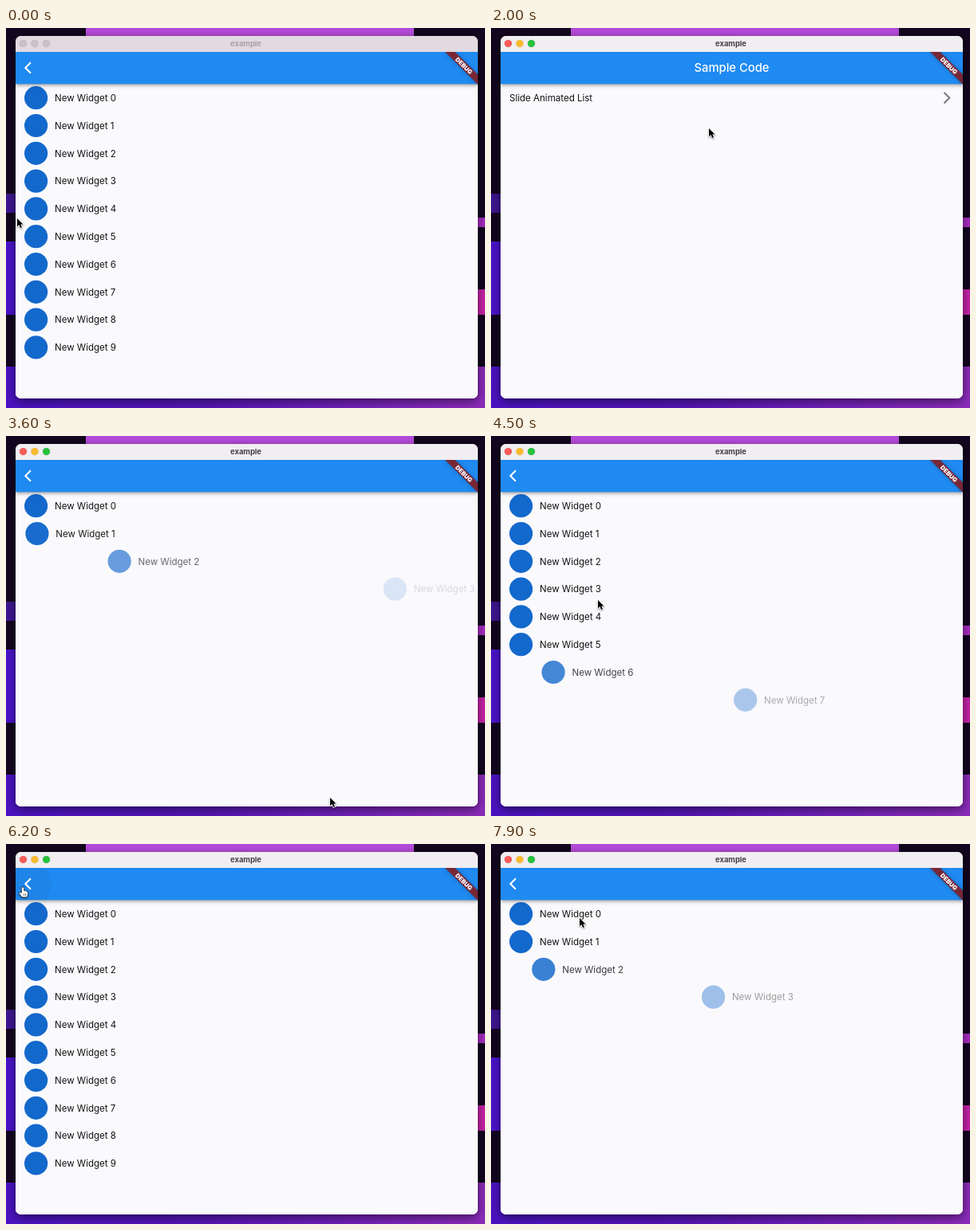
An HTML page with a canvas for the animation above (8000 ms loop, 600x477 px).

```html
<!DOCTYPE html>
<html lang="en">
<head>
<meta charset="utf-8">
<title>Slide animated list</title>
<style>
  html, body { margin: 0; width: 100%; height: 100%; overflow: hidden; background: #12051f; }
  canvas { display: block; width: 600px; height: 477px; }
</style>
</head>
<body>
<canvas id="stage" width="600" height="477"></canvas>
<script>
const c = document.getElementById('stage').getContext('2d');
const LOOP = 8000, STEP = 100;
const FONT = 'Inter, Roboto, sans-serif';
const LEFT = 12, RIGHT = 591, TOP = 30, BAR = 70, BOTTOM = 465, WIDTH = RIGHT - LEFT;
const ROW = 34.8, FIRST = 87.7;
const BG = '#faf9fc', BLUE = '#1f8af1', DISC = '#1368cc', INK = '#131214';

// Page changes; list items start entering at each push.
const POPS = [1020, 6330], PUSHES = [2935, 7132];
const PAGE_MS = 450, ITEM_MS = 500, STAGGER = 205, PRESS_MS = 220, ACTIVE_AT = 700;

// Pointer moves: when they start and end, and where they lead
const REST = { x: 14, y: 239 };
const MOVES = [
  { from: 0, to: 600, x: 22, y: 54 },
  { from: 1200, to: 2000, x: 273, y: 126 },
  { from: 2000, to: 2600, x: 274, y: 93 },
  { from: 2950, to: 3600, x: 406, y: 454 },
  { from: 3700, to: 4500, x: 134, y: 206 },
  { from: 4500, to: 5300, x: 21, y: 54 },
  { from: 6400, to: 6850, x: 111, y: 93 }
];

const ARROW = new Path2D('M0 0V10.2L2.4 8 4.1 12 6 11.2 4.3 7.4H7.5Z');
const HAND = new Path2D('M-1.3 1Q0-.7 1.3 1V4.7L5 5.6Q6.7 6.2 6.2 8.6L5.1 12.6H-.8L-4.3 8.2Q-4.6 6.1-2.7 6.9L-1.3 8Z');

const clamp = v => Math.max(0, Math.min(1, v));
const easeOut = (v, power) => 1 - (1 - clamp(v)) ** power;
const smooth = v => v * v * (3 - 2 * v);

function rect(x, y, w, h, color) {
  c.fillStyle = color;
  c.fillRect(x, y, w, h);
}

function disc(x, y, r, color) {
  c.fillStyle = color;
  c.beginPath();
  c.arc(x, y, r, 0, 7);
  c.fill();
}

function chevron(x, y, dx, color) {
  c.strokeStyle = color;
  c.lineWidth = 2.1;
  c.beginPath();
  c.moveTo(x - dx, y - 6.7);
  c.lineTo(x, y);
  c.lineTo(x - dx, y + 6.7);
  c.stroke();
}

function text(str, x, y, size, weight, color, align = 'left') {
  c.font = `${weight} ${size}px ${FONT}`;
  c.textAlign = align;
  c.fillStyle = color;
  c.fillText(str, x, y);
}

function shadow(color, blur, dy) {
  c.shadowColor = color;
  c.shadowBlur = blur;
  c.shadowOffsetY = dy;
}

function clipped(x, y, w, h, draw) {
  c.save();
  c.beginPath();
  c.rect(x, y, w, h);
  c.clip();
  draw();
  c.restore();
}

function pointerAt(t) {
  let { x, y } = REST;
  for (const m of MOVES) {
    const k = smooth(clamp((t - m.from) / (m.to - m.from)));
    x += (m.x - x) * k;
    y += (m.y - y) * k;
  }
  return { x, y };
}

// How far the list page covers the home page, and when its items began.
function pageAt(t) {
  let open = 1, since = -LOOP;
  POPS.forEach((pop, i) => {
    if (t >= pop) open = 1 - easeOut((t - pop) / PAGE_MS, 3);
    if (t >= PUSHES[i]) {
      open = easeOut((t - PUSHES[i]) / PAGE_MS, 3);
      since = PUSHES[i];
    }
  });
  return { open, since };
}

// The blurred edges of a wallpaper around the window
function desktop() {
  rect(0, 0, 600, 477, '#12051f');
  const floor = c.createLinearGradient(0, 0, 600, 0);
  floor.addColorStop(0, '#4a12c0');
  floor.addColorStop(0.4, '#5414b4');
  floor.addColorStop(1, '#8a2bb8');
  rect(0, 425, 600, 52, floor);
  rect(100, 0, 411, 12, '#b84bdb');
  rect(0, 208, 14, 24, '#3d1590');
  rect(0, 268, 14, 92, '#4a12c8');
  rect(590, 238, 10, 12, '#a52cc0');
  rect(590, 328, 10, 32, '#c421a6');
}

function titleBar(active) {
  rect(LEFT, 10, WIDTH, 20, active ? '#f1eef2' : '#e2dae0');
  ['#fc5b57', '#fdbb2e', '#28c23f'].forEach((color, i) => {
    disc(21.5 + 14.5 * i, 19.5, 4.6, active ? color : '#cbc2c9');
    c.strokeStyle = 'rgba(0,0,0,.13)';
    c.lineWidth = 0.6;
    c.stroke();
  });
  text('example', 300.5, 22.8, 9.4, 700, active ? '#434044' : '#a79fa5', 'center');
}

function appBar() {
  c.save();
  shadow('rgba(0,0,0,.45)', 5, 1.5);
  rect(LEFT, TOP, WIDTH, BAR - TOP + 0.3, BLUE);
  c.restore();
}

function homePage(t, hovered) {
  rect(LEFT, TOP, WIDTH, BOTTOM - TOP, BG);
  const push = PUSHES.find(p => t >= p - PRESS_MS && t < p + PAGE_MS);
  clipped(LEFT, BAR, WIDTH, ROW, () => {
    if (hovered || push) rect(LEFT, BAR, WIDTH, ROW, 'rgba(0,0,0,.04)');
    if (!push) return;
    const k = (t - push + PRESS_MS) / PRESS_MS, tip = pointerAt(push);
    rect(LEFT, BAR, WIDTH, ROW, `rgba(0,0,0,${0.08 * clamp(k)})`);
    disc(tip.x, tip.y, 55 * k, 'rgba(0,0,0,.08)');
  });
  appBar();
  text('Sample Code', 301.5, 55.2, 14.75, 500, '#fff', 'center');
  text('Slide Animated List', 23, 92, 11.55, 400, INK);
  chevron(574.3, 87.8, 6.8, '#7b7a7d');
}

function listPage(t, since, hovered) {
  rect(LEFT, TOP, WIDTH, BOTTOM - TOP, BG);
  for (let i = 0; i < 10; i++) {
    const k = clamp((t - since - i * STAGGER) / ITEM_MS);
    const dx = WIDTH * (1 - easeOut(k, 2.4)), y = FIRST + ROW * i;
    c.globalAlpha = easeOut(k, 1.4);
    disc(37.6 + dx, y, 14.6, DISC);
    text('New Widget ' + i, 61 + dx, y + 4.3, 11.5, 400, INK);
  }
  c.globalAlpha = 1;
  appBar();
  if (hovered) clipped(LEFT, TOP, WIDTH, BAR - TOP, () => disc(28, 50, 29, 'rgba(0,0,0,.045)'));
  chevron(24.3, 50, -6.7, '#fff');
}

function banner() {
  c.save();
  c.translate(RIGHT, TOP);
  c.rotate(Math.PI / 4);
  c.save();
  shadow('rgba(0,0,0,.6)', 5, 0);
  rect(-29, 20.2, 58, 8.7, 'rgba(0,0,0,.45)');
  c.restore();
  rect(-29, 20.2, 58, 8.7, 'rgba(183,28,28,.63)');
  text('DEBUG', 0, 27.3, 7.6, 900, '#fff', 'center');
  c.restore();
}

function pointer({ x, y }, hand) {
  const shape = hand ? HAND : ARROW;
  c.save();
  c.translate(x, y);
  c.lineJoin = 'round';
  c.lineWidth = hand ? 1.1 : 1.6;
  c.strokeStyle = hand ? '#111' : '#fff';
  shadow('rgba(0,0,0,.4)', 2, 1);
  c.stroke(shape);
  shadow('transparent', 0, 0);
  c.fillStyle = hand ? '#fff' : '#000';
  c.fill(shape);
  if (hand) for (const dx of [1.1, 3]) rect(dx, 8.3, 0.6, 2.7, '#111');
  c.restore();
}

function draw(t) {
  const tip = pointerAt(t), { open, since } = pageAt(t);
  const onRow = open < 0.5 && tip.x > LEFT && tip.y > BAR && tip.y < BAR + ROW;
  const onBack = open > 0.5 && tip.x > LEFT && tip.x < 52 && tip.y > TOP && tip.y < BAR;

  desktop();
  c.save();
  shadow('rgba(0,0,0,.55)', 12, 3);
  c.fillStyle = BG;
  c.beginPath();
  c.roundRect(LEFT, 10, WIDTH, BOTTOM - 10, 7);
  c.fill();
  shadow('transparent', 0, 0);
  c.clip();
  titleBar(t >= ACTIVE_AT);
  clipped(LEFT, TOP, WIDTH, BOTTOM - TOP, () => {
    c.save();
    c.translate(-WIDTH / 3 * open, 0);
    homePage(t, onRow);
    c.restore();
    const dx = WIDTH * (1 - open);
    clipped(LEFT + dx, TOP, WIDTH, BOTTOM - TOP, () => {
      c.translate(dx, 0);
      listPage(t, since, onBack);
    });
    banner();
  });
  c.restore();
  pointer(tip, onRow || onBack);
}

const start = performance.now();
function tick() {
  const t = Math.max(0, performance.now() - start) % LOOP;
  draw(Math.floor(t / STEP) * STEP);
  requestAnimationFrame(tick);
}
tick();
</script>
</body>
</html>
```
